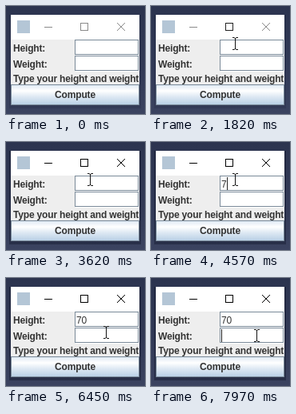
Animation of 174 by 135 pixels, one loop 8000 ms. Source, as an HTML page:

```html
<!DOCTYPE html>
<html lang="en">
<head>
<meta charset="utf-8">
<title>Height and weight form</title>
<style>
html, body { margin: 0; width: 100%; height: 100%; overflow: hidden; background: #2e3652; }
svg { display: block; width: 174px; height: 135px; }
text { font: bold 12px "Liberation Sans", Arial, sans-serif; letter-spacing: -.17px; fill: #333; white-space: pre; }
#typed { font-weight: normal; }
rect { shape-rendering: crispEdges; }
.field { fill: #fff; stroke: #7a8a99; }
.icon { fill: none; shape-rendering: crispEdges; }
#close { shape-rendering: auto; }
</style>
</head>
<body>
<svg viewBox="0 0 174 135">
  <defs>
    <linearGradient id="desk" x2="0" y2="1">
      <stop stop-color="#2c344f"/><stop offset=".6" stop-color="#323a57"/><stop offset="1" stop-color="#3b4360"/>
    </linearGradient>
    <linearGradient id="metal" x2="0" y2="1">
      <stop stop-color="#dde8f3"/><stop offset=".3" stop-color="#fff"/>
      <stop offset=".6" stop-color="#dde8f3"/><stop offset="1" stop-color="#b8cfe5"/>
    </linearGradient>
    <clipPath id="inside"><rect x="6" y="11" width="161" height="113"/></clipPath>
    <g id="field">
      <rect x="87" y="1" width="80" height="19" fill="#fff"/>
      <rect class="field" x="86.5" y=".5" width="79" height="18"/>
    </g>
  </defs>
  <rect width="174" height="135" fill="url(#desk)"/>
  <rect id="shade" x="4" y="11" width="165" height="117" fill="#10142a"/>
  <g clip-path="url(#inside)">
    <rect x="6" y="11" width="161" height="31" fill="#fff"/>
    <rect x="6" y="42" width="161" height="82" fill="#eee"/>
    <rect x="14" y="18" width="16" height="16" fill="#b4c6d6"/>
    <rect id="hover" x="75" y="11" width="46" height="30" fill="#e5e5e5"/>
    <path id="min" class="icon" d="M48 26.5h10"/>
    <path id="max" class="icon" d="M93.5 21.5h9v9h-9z"/>
    <path id="close" class="icon" d="M139 21l10 10m0-10l-10 10"/>
    <text x="9" y="57">Height:</text>
    <text x="9" y="77">Weight:</text>
    <text x="9" y="95">Type your height and weight</text>
    <use href="#field" y="42"/>
    <use href="#field" y="62"/>
    <text id="typed" x="88" y="57"></text>
    <rect x="6.5" y="98.5" width="160" height="25" fill="url(#metal)" stroke="#7a8a99"/>
    <text x="86.5" y="115" text-anchor="middle">Compute</text>
    <rect id="caret" width="1" height="16" fill="#222"/>
  </g>
  <g id="pointer">
    <circle id="click" cx="-2" r="12" fill="#ff0" fill-opacity=".55"/>
    <path id="beam" d="M-3 -7.5h2l1.5 1 1.5-1h2M-3 7.5h2l1.5-1 1.5 1h2M.5 -7v14" fill="none" stroke="#111"/>
    <path id="arrow" d="M.5 .5v16l3.7-3.6 2.6 6 2.2-1-2.6-5.7h5.2z" fill="#fff" stroke="#111"/>
    <path id="resize" d="M-11 .5l4.5-4.5v3.5h13v-3.5l4.5 4.5-4.5 4.5v-3.5h-13v3.5z" fill="#fff" stroke="#111"/>
  </g>
</svg>
<script>
const $ = id => document.getElementById(id);
const show = (id, on) => $(id).style.display = on ? '' : 'none';
const between = (v, a, b) => v >= a && v < b;

// time, x, y
const route = [
  [870, 184, 119], [950, 168, 115], [1180, 168, 115], [1340, 148, 84],
  [1500, 118, 44], [1620, 101, 27], [1790, 105, 47], [5660, 105, 47],
  [6060, 125, 68], [6440, 125, 68], [6760, 132, 72], [8000, 132, 72]
];
// each edit restarts the caret blink: time, x, y
const edits = [[2090, 88, 44], [4570, 95, 44], [4930, 102, 44], [6830, 88, 64]];

function position(t) {
  const i = Math.max(1, route.findIndex(p => p[0] > t));
  const [t0, x0, y0] = route[i - 1], [t1, x1, y1] = route[i];
  const k = Math.max(0, (t - t0) / (t1 - t0));
  return [x0 + (x1 - x0) * k, y0 + (y1 - y0) * k];
}

function draw(t) {
  const active = t >= 2100;
  const color = active ? '#000' : '#8a8a8a';
  for (const id of ['min', 'max', 'close']) $(id).style.stroke = color;
  if (between(t, 1560, 2100)) $('max').style.stroke = '#222';
  $('shade').style.opacity = active ? .4 : .15;

  const [x, y] = position(t);
  const onField = between(x, 87, 165) && (between(y, 43, 61) || between(y, 63, 81));
  const onEdge = x > 162;
  show('hover', between(x, 75, 121) && between(y, 11, 41));
  show('pointer', t >= 870);
  show('beam', onField);
  show('resize', onEdge);
  show('arrow', !onField && !onEdge);
  show('click', between(t, 2060, 2220) || between(t, 6790, 7010));
  $('pointer').setAttribute('transform', `translate(${Math.round(x)} ${Math.round(y)})`);

  $('typed').textContent = t < 4570 ? '' : t < 4930 ? '7' : '70';
  const edit = edits.filter(e => e[0] <= t).pop();
  show('caret', edit && Math.floor((t - edit[0]) / 500) % 2 === 0);
  if (edit) {
    $('caret').setAttribute('x', edit[1]);
    $('caret').setAttribute('y', edit[2]);
  }
}

const start = performance.now();
function tick() {
  draw((performance.now() - start) % 8000);
  requestAnimationFrame(tick);
}
tick();
</script>
</body>
</html>
```
